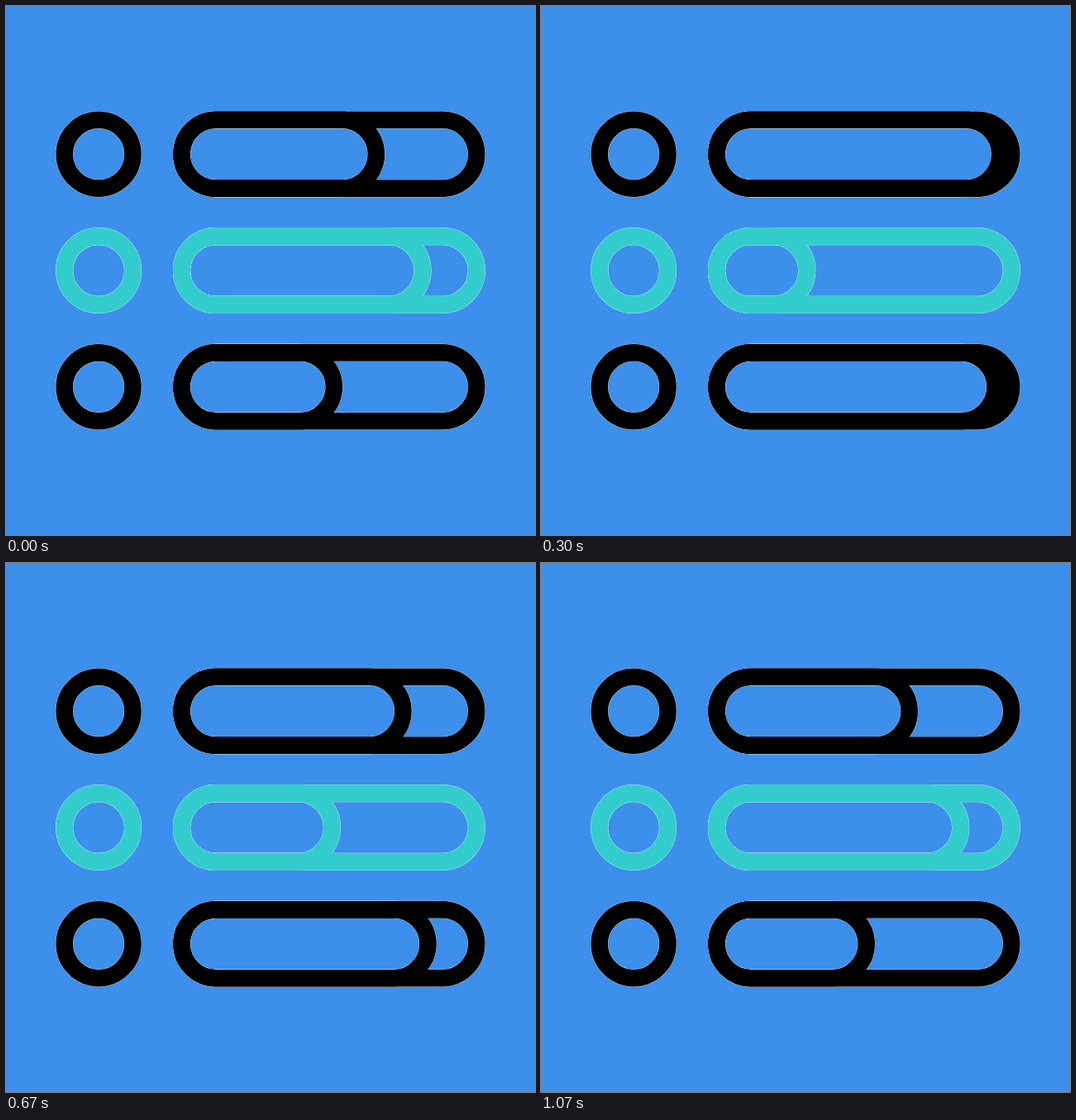
An HTML page with a canvas that plays this animation: 640 px wide and 640 px high, repeating every 1670 ms.

```html
<!DOCTYPE html>
<html lang="en">
<head>
<meta charset="utf-8">
<title>Sliding bars</title>
<style>
  html, body { margin: 0; width: 100%; height: 100%; overflow: hidden; background: #3c8fea; }
  canvas { display: block; width: 100vmin; height: 100vmin; }
</style>
</head>
<body>
<canvas id="stage" width="640" height="640"></canvas>
<script>
const ctx = document.getElementById('stage').getContext('2d');

const LOOP = 1670;
const LINE = 20.6;
const RIM = 0.5;              // extra width of the pale edge under each line
const RADIUS = 51.7;          // outer radius of rings and bar ends
const LEFT = 202.2, RIGHT = 579.6;
const OUT_START = -1, OUT_LENGTH = 12.6, BACK_START = 12;

// rest and far: outer right edge of the sliding end; back: length of the return in ticks
const rows = [
  { y: 179.2, color: '#000000', rest: 456, far: 579, back: 12.7 },
  { y: 320.0, color: '#33cccc', rest: 518, far: 309, back: 16.8 },
  { y: 460.8, color: '#000000', rest: 404, far: 579, back: 19.9 }
];

const clamp = v => Math.min(1, Math.max(0, v));
const smooth = u => u * u * (3 - 2 * u);

// cubic-bezier(.43, 0, .57, 1)
function easeInOut(x) {
  let lo = 0, hi = 1;
  for (let i = 0; i < 24; i++) {
    const s = (lo + hi) / 2, r = 1 - s;
    const bx = 1.29 * r * r * s + 1.71 * r * s * s + s * s * s;
    if (bx < x) lo = s; else hi = s;
  }
  return smooth((lo + hi) / 2);
}

function edgeAt(row, tick) {
  const p = tick < BACK_START
    ? smooth(clamp((tick - OUT_START) / OUT_LENGTH))
    : 1 - easeInOut(clamp((tick - BACK_START) / row.back));
  return row.rest + (row.far - row.rest) * p;
}

function pill(left, right, y) {
  const r = RADIUS - LINE / 2;
  ctx.beginPath();
  ctx.arc(left + RADIUS, y, r, Math.PI / 2, Math.PI * 1.5);
  ctx.arc(right - RADIUS, y, r, -Math.PI / 2, Math.PI / 2);
  ctx.closePath();
  ctx.stroke();
}

function drawRow(row, edge, color, width) {
  ctx.strokeStyle = color;
  ctx.lineWidth = width;
  pill(112.1 - RADIUS, 112.1 + RADIUS, row.y);
  pill(LEFT, RIGHT, row.y);
  pill(LEFT, edge, row.y);
}

function draw(ms) {
  // the picture steps 30 times a second
  const tick = Math.floor((ms % LOOP) * 0.03 + 0.11);
  ctx.fillStyle = '#3c8fea';
  ctx.fillRect(0, 0, 640, 640);
  for (const row of rows) {
    const edge = edgeAt(row, tick);
    drawRow(row, edge, '#ffffff', LINE + RIM);
    drawRow(row, edge, row.color, LINE);
  }
}

const start = performance.now();
function loop() {
  draw(performance.now() - start);
  requestAnimationFrame(loop);
}
loop();
</script>
</body>
</html>
```
